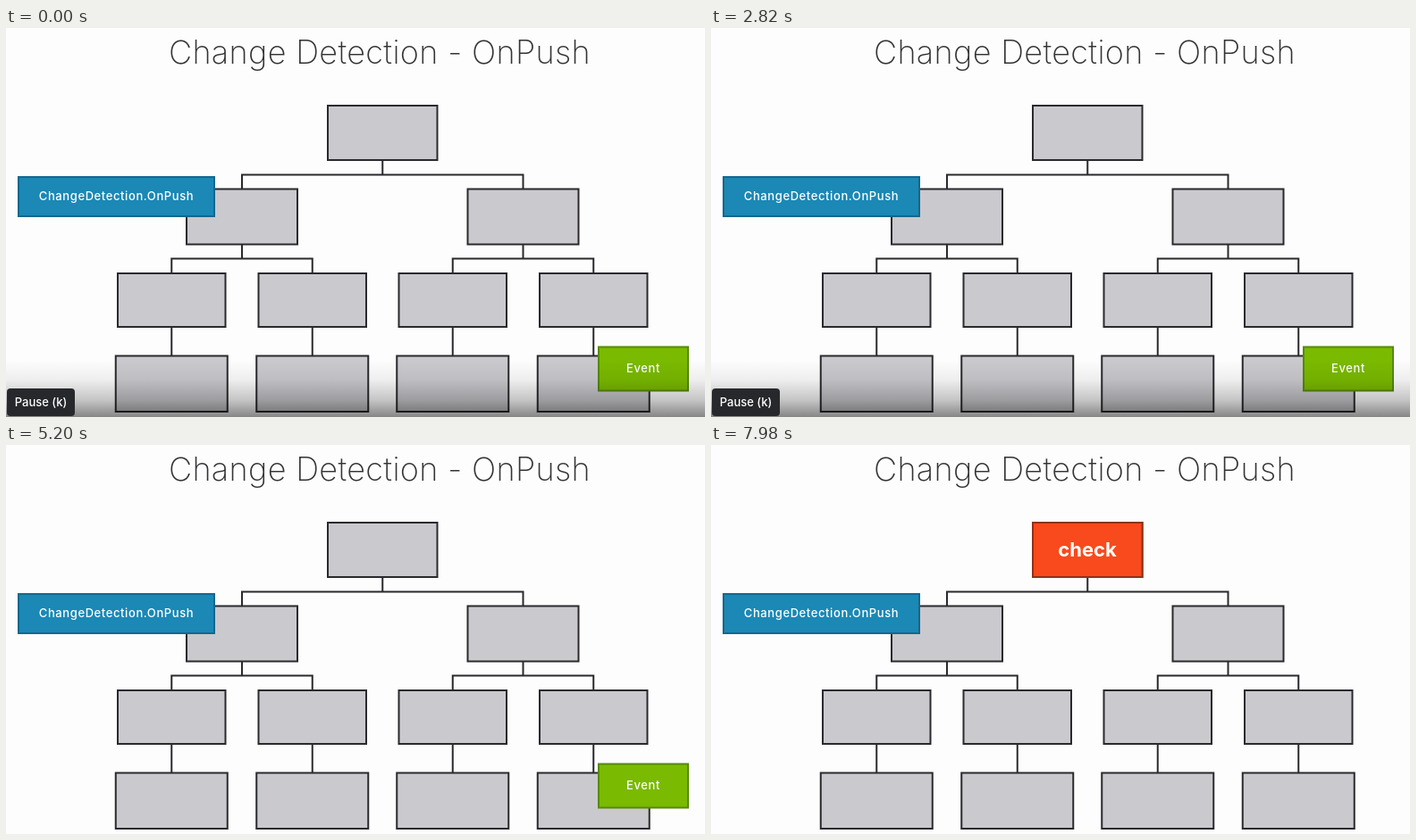
These frames come from a looping animation (782x436 px, 8000 ms). An HTML page:

```html
<!DOCTYPE html>
<html lang="en">
<head>
<meta charset="utf-8">
<title>Change Detection - OnPush</title>
<style>
  html, body { margin: 0; width: 100%; height: 100%; overflow: hidden; background: #fdfdfd; }
  svg { display: block; width: 782px; height: 436px; }
  text { font: 500 13px Inter, "Open Sans", sans-serif; fill: #fff; text-anchor: middle; }
  rect { stroke-width: 2; }
  .title { font-size: 36px; font-weight: 250; letter-spacing: .35px; fill: #333336; }
  .label { letter-spacing: .6px; }
  .check { font-size: 22px; font-weight: 700; }
  #tree { fill: #cac9cd; stroke: #2a2a2e; stroke-width: 2; }
  #tree path { fill: none; }
</style>
</head>
<body>
<svg viewBox="0 0 782 436">
  <defs>
    <linearGradient id="fade" x1="0" y1="0" x2="0" y2="1">
      <stop offset="0" stop-opacity="0"/>
      <stop offset=".35" stop-opacity=".06"/>
      <stop offset=".7" stop-opacity=".22"/>
      <stop offset="1" stop-opacity=".47"/>
    </linearGradient>
  </defs>
  <text class="title" x="418" y="40">Change Detection - OnPush</text>
  <g id="tree"></g>
  <g id="check">
    <rect x="360" y="87" width="122.5" height="61" fill="#f84a1c" stroke="#8f3218"/>
    <text class="check" x="421" y="125">check</text>
  </g>
  <rect x="14" y="167" width="219" height="44" fill="#1b88b5" stroke="#14688e"/>
  <text class="label" x="123.5" y="193">ChangeDetection.OnPush</text>
  <g id="event">
    <rect x="663" y="357.5" width="100" height="49" fill="#7aba00" stroke="#568a08"/>
    <text class="label" x="713" y="386">Event</text>
  </g>
  <rect id="shade" y="372" width="782" height="64" fill="url(#fade)"/>
  <g id="tooltip">
    <rect x="1" y="404" width="76" height="31" rx="4" fill="#26282b"/>
    <text x="39" y="424">Pause (k)</text>
  </g>
</svg>
<script>
const LOOP = 8000;
const byId = id => document.getElementById(id);
const [tree, check, event, shade, tooltip] =
  ['tree', 'check', 'event', 'shade', 'tooltip'].map(byId);

const box = (center, top, width, height) =>
  `<rect x="${center - width / 2}" y="${top}" width="${width}" height="${height}"/>`;
const fork = (center, top, bar, bottom, spread) =>
  `<path d="M${center} ${top}V${bar}M${center - spread} ${bottom}V${bar}H${center + spread}V${bottom}"/>`;

let parts = box(421.25, 87, 122.5, 61) + fork(421.25, 148, 164.5, 180.5, 157.25);
for (const parent of [264, 578.5]) {
  parts += box(parent, 180.5, 124, 62) + fork(parent, 242.5, 258.5, 275, 78.75);
  for (const child of [parent - 78.75, parent + 78.75]) {
    parts += `<path d="M${child} 335V367"/>` + box(child, 275, 120.5, 60) + box(child, 367.5, 125, 62.5);
  }
}
tree.innerHTML = parts;

const progress = (time, start, end) => Math.min(1, Math.max(0, (time - start) / (end - start)));

function draw(now) {
  const time = now % LOOP;
  const checking = progress(time, 6060, 6360);
  tooltip.style.opacity = 1 - progress(time, 4480, 4600);
  shade.style.opacity = 1 - progress(time, 4560, 5080);
  event.style.opacity = 1 - checking;
  check.style.opacity = checking;
  requestAnimationFrame(draw);
}
draw(0);
</script>
</body>
</html>
```
